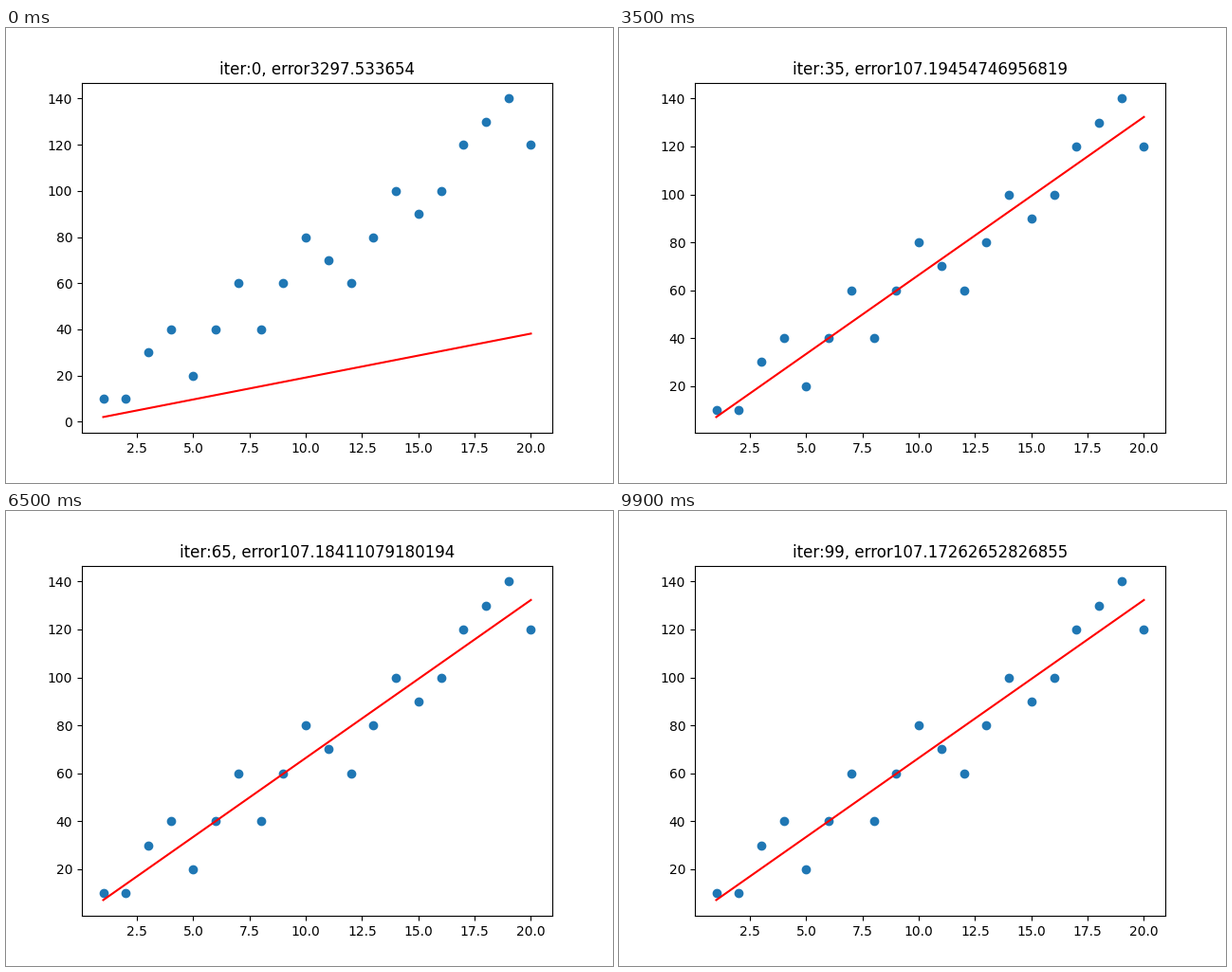
A matplotlib script for the animation above (10 s loop, 640 px wide and 480 px high).

```python
import matplotlib.pyplot as plt
import numpy as np
from matplotlib.animation import FuncAnimation

STEPS = 100
RATE = 0.001

x = np.arange(1.0, 21.0)
y = 10.0 * np.array([1, 1, 3, 4, 2, 4, 6, 4, 6, 8,
                     7, 6, 8, 10, 9, 10, 12, 13, 14, 12])
n = float(len(x))


def descend(m, b):
    """One gradient step on the mean squared error."""
    residual = y - m * x - b
    grad_b = np.sum(-(2 / n) * residual)
    grad_m = np.sum(-(2 / n) * x * residual)
    return m - RATE * grad_m, b - RATE * grad_b


def mean_error(m, b):
    return float(np.sum((y - m * x - b) ** 2) / n)


def fit():
    m = b = 0.0
    history = []
    for i in range(STEPS):
        m, b = descend(m, b)
        err = mean_error(m, b)
        # the first error is an exact short decimal
        history.append((m, b, err if i else round(err, 9)))
    return history


history = fit()
fig, ax = plt.subplots(figsize=(6.4, 4.8), dpi=100)


def draw(i):
    m, b, err = history[i]
    ax.clear()
    ax.scatter(x, y)
    ax.plot(x, m * x + b, "r")
    ax.set_title(f"iter:{i}, error{err}")
    return ax.get_children()


anim = FuncAnimation(fig, draw, frames=STEPS, interval=100,
                     init_func=lambda: [], repeat=True, repeat_delay=0)
plt.show()
```
